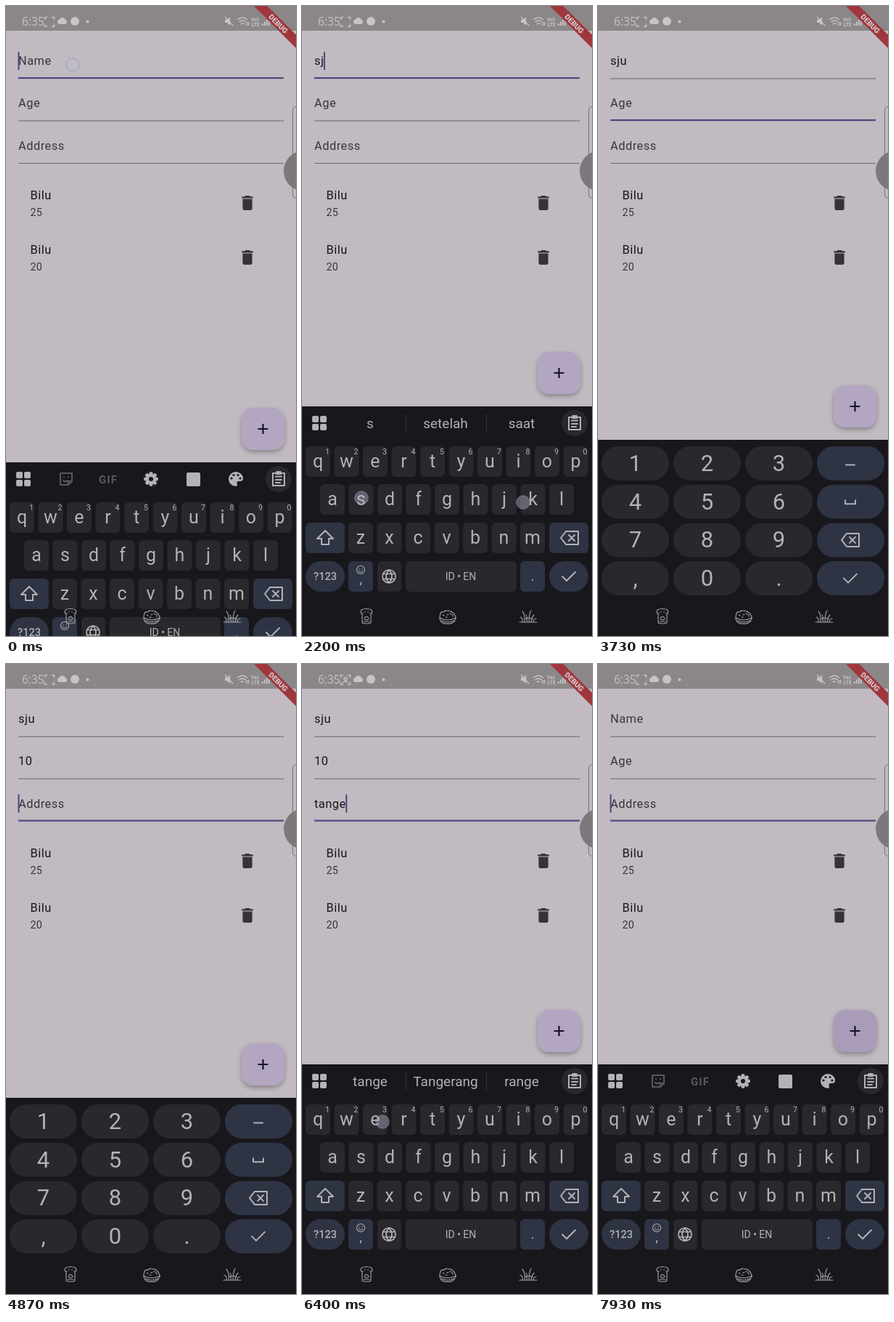
Recreate the animation shown at these times as an HTML page. Size 400 px wide and 867 px high, loop 8 s.

```html
<!DOCTYPE html>
<html lang="en">
<head>
<meta charset="utf-8">
<title>Form entry on a phone</title>
<style>
html, body { margin: 0; width: 100%; height: 100%; overflow: hidden; background: #c1bac1; }
svg { display: block; width: 400px; height: 867px; font-family: Roboto, sans-serif; }
text { white-space: pre; }
.field { font-size: 16.4px; letter-spacing: .5px; }
.sub { font-size: 14.4px; letter-spacing: .25px; fill: #3a363b; }
.mid { text-anchor: middle; fill: #b3b2b5; }
.line { fill: none; stroke: #b3b2b5; stroke-width: 2; stroke-linecap: round; stroke-linejoin: round; }
.thin { fill: none; stroke: #a5a4a7; stroke-width: 1.1; stroke-linecap: round; stroke-linejoin: round; }
</style>
</head>
<body>
<svg id="stage" viewBox="0 0 400 867"></svg>
<script>
const LOOP = 8000;
const KEY = '#29282c', ACCENT = '#2e3444', INK = '#b3b2b5', KB = '#18171b';

// ---- drawing helpers ----
const box = (x, y, w, h, r, fill, extra = '') =>
  `<rect x="${x}" y="${y}" width="${w}" height="${h}" rx="${r}" fill="${fill}" ${extra}/>`;
const label = (s, x, y, size, extra = '') =>
  `<text class="mid" x="${x}" y="${y}" font-size="${size}" ${extra}>${s}</text>`;
const path = (d, cls = 'line', extra = '') => `<path class="${cls}" d="${d}" ${extra}/>`;
const move = (x, y, s) => `<g transform="translate(${x} ${y})">${s}</g>`;

const backspace = move(0, 0, path('M-5-9H12V9H-5L-12 0ZM-1-4L7 4M7-4L-1 4'));
const check = path('M-9 0L-3 6L9-6');

// ---- app ----
const FIELDS = [['Name', 81], ['Age', 139], ['Address', 197.5]];
const fields = FIELDS.map(([, y], i) =>
  `<text class="field" id="text${i}" x="17" y="${y}"></text><rect id="rule${i}" x="17" width="366"/>`).join('');

const trash = 'M6 19c0 1.1.9 2 2 2h8c1.1 0 2-.9 2-2V7H6zM19 4h-3.5l-1-1h-5l-1 1H5v2h14z';
const item = (y, name, age) =>
  `<text class="field" x="33.5" y="${y}" fill="#17151a">${name}</text>
   <text class="sub" x="33.5" y="${y + 23}">${age}</text>
   <path d="${trash}" fill="#363238" transform="translate(319.8 ${y - 8.2}) scale(1.1)"/>`;

const status = `
  <rect width="400" height="34" fill="#8b8688"/>
  <g fill="#c8c3c5" stroke="none">
    <text x="22" y="27" font-size="15.5" font-family="'Open Sans', sans-serif" textLength="">6:35</text>
    <path d="M73.5 25a3.2 3.2 0 0 1 0-6.3a4.4 4.4 0 0 1 8-.2a3.4 3.4 0 0 1 .3 6.5z"/>
    <circle cx="95" cy="21" r="6"/><circle cx="112.500" cy="21.500" r="2"/>
    <path d="M302 19h3l4-4v12l-4-4h-3z"/>
    <path d="M353 27v-3h1.800v3zm3 0v-5.500h1.800v5.500zm3 0v-8h1.800v8zm3 0v-11h1.800v11z"/>
    <rect x="369" y="15" width="8" height="13" rx="1.5"/>
    <text x="338" y="20.500" font-size="7.200" font-weight="700">Vo)</text>
    <text x="338.500" y="28" font-size="7" font-weight="700">LTE</text>
  </g>
  <g fill="none" stroke="#c8c3c5" stroke-width="1.4">
    <path d="M53.500 19v-3.500h3.500M63 15.500h3.500v3.500M66.500 24.500v3.500h-3.500M57 28h-3.500v-3.500"/>
    <path d="M302 15l11 12M319 19q7-6 14 0M321.500 22q4.500-4 9 0M324 25q2-2 4 0M332 22v5M334.500 22v5"/>
    <g id="rec"><circle cx="60" cy="20.500" r="2"/><path d="M56.500 26q3.500-4.500 7 0"/></g>
  </g>`;

const banner = `<g transform="translate(400 0) rotate(45)">
  <rect x="-46" y="28" width="92" height="13" fill="#9f373d"/>
  <text y="38.200" font-size="10.200" font-weight="900" text-anchor="middle" fill="#d2c6c8">DEBUG</text></g>`;

const fab = `<g id="fab">
  <rect x="-29.500" y="-29" width="59" height="58" rx="16" fill="#b2a6c1" id="fabFace" filter="url(#shade)"/>
  <path d="M-7 0H7M0-7V7" stroke="#18122c" stroke-width="2.200"/></g>`;

// ---- keyboards ----
const keyPos = {};
const row = (chars, x0, y, hints) => [...chars].map((c, i) => {
  const x = x0 + 39.5 * i;
  keyPos[c] = [x, y];
  return `<g id="key-${c}">${box(x - 17, y - 21, 34, 42, 6, KEY)}${label(c, x, y + 8, 25)}</g>` +
    (hints ? label((i + 1) % 10, x + 13, y - 10, 10.5) : '');
}).join('');

const smile = `<g class="thin" style="stroke:${INK}"><circle cx="81" cy="776" r="5.500"/>
  <path d="M78.500 777.500q2.500 3 5 0M79.200 774.500v.4M82.800 774.500v.4"/></g>`;
const globe = move(120, 785, path('M-9 0A9 9 0 1 1 9 0A9 9 0 1 1-9 0M-8-3.500H8M-8 3.500H8M0-9Q-8 0 0 9Q8 0 0-9',
  'line', 'style="stroke-width:1.7"'));

const letters = `<g id="abc">
  ${row('qwertyuiop', 22, 627, true)}${row('asdfghjkl', 42, 679)}${row('zxcvbnm', 81, 732)}
  ${box(5, 711, 54, 42, 6, ACCENT)}${move(32, 732, path('M0-10L11 1H5V9H-5V1H-11Z'))}
  ${box(341, 711, 54, 42, 6, ACCENT)}${move(369, 732, backspace)}
  ${box(5, 764, 54, 42, 21, ACCENT)}${label('?123', 32, 790, 14.5, 'font-weight="500"')}
  ${box(64, 764, 34, 42, 6, ACCENT)}${smile}${label(',', 81, 795, 19)}
  ${box(104, 764, 33, 42, 6, KEY)}${globe}
  ${box(143, 764, 153, 42, 6, KEY)}${label('ID • EN', 219, 790, 14)}
  ${box(301, 764, 34, 42, 6, ACCENT)}${label('.', 318, 791, 19)}
  ${box(341, 764, 54, 42, 21, ACCENT)}${move(368, 785, check)}
</g>`;

const numCols = [5, 104, 203, 302], numRows = ['123', '456', '789', ',0.'];
const numIcons = [path('M-6 2H6'), path('M-7-2V3H7V-2'), backspace, check];
const numbers = `<g id="num">${numRows.map((r, j) => {
  const y = 606 + 52.7 * j;
  return [...r].map((c, i) => box(numCols[i], y, 93, 47, 23, KEY, `id="num-${c}"`) +
    label(c, numCols[i] + 46.5, y + 34, 31)).join('') +
    box(302, y, 93, 47, 23, ACCENT) + move(348, y + 23.5, numIcons[j]);
}).join('')}</g>`;

const gear = [...Array(8)].map((_, i) =>
  `<rect x="-2.300" y="-9.800" width="4.600" height="5" rx="1" transform="rotate(${i * 45})"/>`).join('');
const tools = `<g id="tools">
  <g opacity=".42">${move(83, 574, path('M-8-8H8V3L3 8H-8ZM8 3H3V8M-3-3v.2M3-3v.2M-4 2Q-1 5 2 2'))}
  ${label('GIF', 141, 579.5, 15, 'font-weight="700" letter-spacing="1"')}</g>
  ${move(200, 574, `<g fill="${INK}">${gear}</g><circle r="5.300" fill="none" stroke="${INK}" stroke-width="4.500"/>`)}
  ${box(249, 565, 19, 19, 2, INK)}
  ${move(317, 574, `<path fill="${INK}" d="M0-10A10 10 0 0 0 0 10Q3 9 1.500 6Q1 3 4 3H6Q10 3 10-1A10 9 0 0 0 0-10"/>
    <g fill="${KB}"><circle cx="-6" cy="-1" r="1.600"/><circle cx="-3" cy="-5.500" r="1.600"/>
    <circle cx="3" cy="-5.500" r="1.600"/><circle cx="6" cy="-1" r="1.600"/></g>`)}
</g>`;
const SLOTS = [94, 198, 303];
const hintBar = `<g id="hints">${SLOTS.map((x, i) => label('', x, 581, 19, `id="hint${i}"`)).join('')}
  <path d="M143.500 562v25M254.500 562v25" stroke="#333237"/></g>`;
const toolbar = `<g id="toolbar">
  ${[[14, 564], [25, 564], [14, 575], [25, 575]].map(([x, y]) => box(x, y, 9, 9, 2, INK)).join('')}
  ${tools}${hintBar}
  <circle cx="376" cy="574" r="18" fill="${KEY}"/>
  ${move(376, 574, path('M-8-8H8V9H-8ZM-4-3.500H4M-4 1H4M-4 5H2') + box(-4, -11, 8, 5, 1.500, INK))}
</g>`;

const paw = move(89, 840, path(
  'M-6-3V9Q0 11 6 9V-3Q9-5 7-9Q0-12-7-9Q-9-5-6-3ZM-3 3Q0-3 3 3Q0 7-3 3M-5-5v1M-2-7v1M2-7v1M5-5v1M-4 7H4', 'thin'));
const cat = move(201, 841, path(
  'M-11-1Q-10-9-5-7L-3-9Q8-9 10-2Q12 1 11 2Q8 10 0 9Q-9 10-11 2ZM-11 1Q0 7 11 1M-7-3l2 1M-1-3l2-1M-3 0h2M3-5Q7-4 7-1M-8 5Q0 9 8 5', 'thin'));
const grass = move(312, 841, path(
  'M-12 7H12M-8 7Q-7 1-11 0M-5 7Q-4-4-8-8M-2 7Q-1 0-3-3M1 7Q1-4 4-9M4 7Q5 0 8-3M7 7Q7 3 11 2M-5 3Q0-1 6 3', 'thin'));

const popup = `<g id="popup"><circle cy="-1" r="28" fill="#27262a"/>
  <text class="mid" id="popText" y="8" font-size="26"></text>
  ${[-4, 0, 4].map(x => `<circle cx="${x}" cy="18" r="1.200" fill="${INK}"/>`).join('')}</g>`;

// ---- timeline: [ms, value] ----
const TEXTS = [
  [[0, ''], [2000, 's'], [2200, 'sj'], [2470, 'sju'], [7670, '']],
  [[0, ''], [4000, '1'], [4200, '10'], [7670, '']],
  [[0, ''], [5730, 't'], [5930, 'ta'], [6070, 'tan'], [6200, 'tang'], [6330, 'tange'],
   [6600, 'Tangerang '], [7670, '']]
];
const FOCUS = [[0, 0], [2870, 1], [4670, 2]];
const PAD = [[0, false], [3070, true], [4930, false]];
const SLIDE = [[0, 77], [70, 42], [130, 19], [200, 7], [270, 2], [330, 0]];
const HINTS = [[0, ''], [2000, 's setelah saat'], [2270, 'sj saja sejak'], [2530, 'sju saju seju'],
  [3070, ''], [5800, 't tapi tidak'], [6000, 'ta tapi tahun'], [6130, 'tan tanpa tanah'],
  [6270, 'tang tanggal tangan'], [6390, 'tange Tangerang range'], [6600, 'Selatan dan Kota'], [7670, '']];
const CARET = [[0, 1], [800, .5], [870, 0], [1270, .5], [1330, 1], [1800, .5], [1870, 0], [2000, 1],
  [3330, .5], [3400, 0], [3870, 1], [5070, .5], [5130, 0], [5600, 1], [6800, .5], [6870, 0],
  [7200, .5], [7270, 1]];
const PRESSES = [['s', 1870, 2000], ['j', 2070, 2190], ['u', 2330, 2470], ['t', 5600, 5730],
  ['a', 5830, 5930], ['n', 5970, 6070], ['g', 6130, 6200], ['e', 6270, 6330]];
const PAD_PRESSES = [['1', 3870, 4000], ['0', 4070, 4200]];
// x, y, down, up
const TOUCHES = [[92, 81, 0, 20], [82, 677, 1870, 2200], [305, 683, 2070, 2230], [262, 628, 2330, 2460],
  [180, 137, 2800, 2900], [52, 632, 3870, 3970], [150, 788, 4070, 4170], [198, 188, 4530, 4630],
  [178, 628, 5600, 5700], [37, 683, 5800, 5930], [281, 733, 5970, 6060], [202, 681, 6130, 6200],
  [111, 630, 6270, 6420], [198, 576, 6470, 6570], [354, 507, 7530, 7640]];
const FADE = 150;

const dots = TOUCHES.map(([x, y], i) => `<circle id="dot${i}" cx="${x}" cy="${y}" r="9.300"
  fill="#b9bbcd" fill-opacity=".42" stroke="#8290b9" stroke-opacity=".6"/>`).join('');

document.getElementById('stage').innerHTML = `
  <defs><filter id="shade" x="-30%" y="-30%" width="160%" height="160%">
    <feDropShadow dx="0" dy="3" stdDeviation="3" flood-color="#000" flood-opacity=".3"/></filter></defs>
  <rect width="400" height="867" fill="#c1bac1"/>
  ${fields}<rect id="caret" width="2" height="25" fill="#4f4580"/>
  ${item(266, 'Bilu', 25)}${item(341, 'Bilu', 20)}
  ${fab}${status}${banner}
  <rect id="panel" width="400" height="400" fill="${KB}"/>
  <g id="keys">${toolbar}${letters}${numbers}${popup}</g>
  ${paw}${cat}${grass}
  <rect x="395.500" y="138.500" width="20" height="126" rx="5" fill="none" stroke="#757075"/>
  <circle cx="411" cy="227" r="28" fill="#797477" opacity=".94"/>
  ${dots}`;

// ---- playback ----
const $ = id => document.getElementById(id);
const at = (steps, t) => steps.reduce((v, [ms, next]) => t >= ms ? next : v, steps[0][1]);
const show = (id, on) => $(id).setAttribute('visibility', on ? 'inherit' : 'hidden');
const put = (id, attrs) => { for (const k in attrs) $(id).setAttribute(k, attrs[k]); };
const held = (t, down, up) => t >= down && t < up;

function render(t) {
  const focus = at(FOCUS, t), pad = at(PAD, t), slide = at(SLIDE, t);
  const top = (pad ? 597 : 551) + slide;

  FIELDS.forEach(([hint, y], i) => {
    const value = at(TEXTS[i], t), on = i === focus;
    $('text' + i).textContent = value || hint;
    put('text' + i, { fill: value ? '#17151a' : '#3a363b' });
    put('rule' + i, { y: y + (on ? 17 : 18.5), height: on ? 2.2 : 1, fill: on ? '#51467d' : '#696469' });
    if (on) put('caret', {
      x: 16.5 + (value ? $('text' + i).getComputedTextLength() : 0),
      y: y - 18, opacity: at(CARET, t)
    });
  });
  show('rec', held(t % 1000, 270, 730));

  put('panel', { y: top });
  put('keys', { transform: `translate(0 ${slide})` });
  put('fab', { transform: `translate(354.500 ${top - 46})` });
  put('fabFace', { fill: t >= 7600 ? '#a99cb9' : '#b2a6c1' });
  show('abc', !pad);
  show('toolbar', !pad);
  show('num', pad);

  const hints = at(HINTS, t);
  show('tools', !hints);
  show('hints', hints);
  hints.split(' ').forEach((word, i) => { $('hint' + i).textContent = word; });

  const press = PRESSES.find(([, down, up]) => held(t, down, up));
  PRESSES.forEach(p => show('key-' + p[0], p === press));
  PRESSES.forEach(p => show('key-' + p[0], p !== press));
  show('popup', press);
  if (press) {
    const [x, y] = keyPos[press[0]];
    put('popup', { transform: `translate(${x} ${y - 53})` });
    $('popText').textContent = press[0];
  }
  PAD_PRESSES.forEach(([c, down, up]) => put('num-' + c, { fill: held(t, down, up) ? '#3b3a40' : KEY }));

  TOUCHES.forEach(([, , down, up], i) => {
    put('dot' + i, { opacity: t < down ? 0 : Math.max(0, Math.min(1, 1 - (t - up) / FADE)) });
  });
}

const start = performance.now();
function tick() {
  render((performance.now() - start) % LOOP);
  requestAnimationFrame(tick);
}
tick();
</script>
</body>
</html>
```
